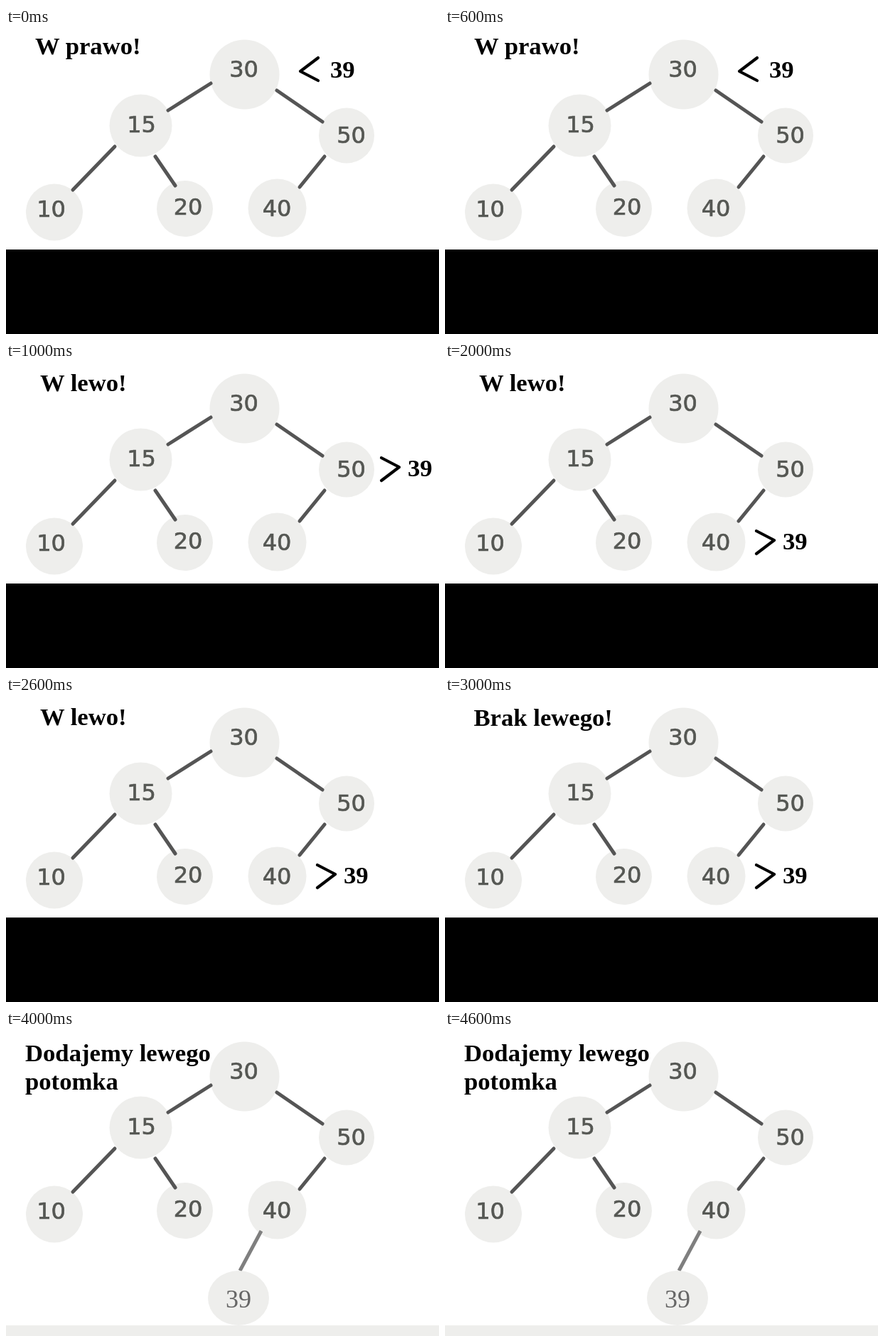
Animation of 609 by 431 pixels, one loop 5 s. Source, as an HTML page:

```html
<!DOCTYPE html>
<html lang="pl">
<head>
<meta charset="utf-8">
<style>
  html, body { margin: 0; width: 100%; height: 100%; overflow: hidden; background: #000; }
  svg { display: block; }
  text { white-space: pre; }
  .label { font: bold 34.67px "Liberation Serif", "Times New Roman", serif; }
  .node { font: 32px "DejaVu Sans", sans-serif; text-anchor: middle; fill: #555753; stroke: #555753; stroke-width: .7; }
  .added { font: 36px "Liberation Serif", serif; text-anchor: middle; fill: #666; }
  .edge { stroke: #555; stroke-width: 5; stroke-linecap: round; }
  .sign { fill: none; stroke: #000; stroke-width: 4.2; stroke-linecap: round; stroke-linejoin: round; }
</style>
</head>
<body>
<svg width="609" height="431" viewBox="0 0 609 431">
  <rect width="609" height="431" fill="#eeeeec"/>
  <rect width="609" height="416" fill="#fff"/>
  <g id="tree"></g>
  <g id="step"></g>
</svg>
<script>
const STEP_MS = 1000;

// circle x, y, radius, then value, text centre and baseline
const nodes = [
  [335.5, 65.5, 49, 30, 334.5, 68.5],
  [189.5, 137.5, 44, 15, 190.5, 147],
  [479, 151.5, 39, 50, 485.5, 162],
  [68, 259.5, 40, 10, 63.5, 266],
  [251.5, 254.5, 39.5, 20, 256, 263],
  [381.5, 253.5, 41, 40, 381, 265]
];
const edges = ["M288 78L228 116", "M381 88L445 132", "M153 167L94 228", "M210 181L238 222", "M448 181L413 224"];

const text = (cls, x, y, s) => `<text class="${cls}" x="${x}" y="${y}">${s}</text>`;
const label = (x, y, s) => text("label", x, y, s);
const compare = (sign, x, y) => `<path class="sign" d="${sign}"/>` + label(x, y, 39);
const less = "M439 42L414 61L439 74";
const greater = (x, y) => `M${x} ${y}l25 13l-25 19`;
const floor = '<rect y="312" width="609" height="119"/>';

const steps = [
  floor + label(41, 37, "W prawo!") + compare(less, 456, 70),
  floor + label(48, 41, "W lewo!") + compare(greater(528, 135), 565, 161),
  floor + label(48, 41, "W lewo!") + compare(greater(438, 238), 475, 264),
  floor + label(40.5, 42, "Brak lewego!") + compare(greater(438, 238), 475, 264),
  label(27, 44, "Dodajemy lewego") + label(27, 84, "potomka") +
    '<path d="M359 283L329 339" stroke="#7f7f7f" stroke-width="5"/>' +
    '<ellipse cx="327" cy="377.5" rx="43" ry="38.5" fill="#eeeeec"/>' +
    text("added", 327, 391, 39)
];

const tree = document.getElementById("tree");
const stage = document.getElementById("step");
tree.innerHTML =
  nodes.map(([x, y, r, value, tx, ty]) =>
    `<circle cx="${x}" cy="${y}" r="${r}" fill="#eeeeec"/>` + text("node", tx, ty, value)).join("") +
  edges.map(d => `<path class="edge" d="${d}"/>`).join("");

const start = performance.now();
let shown = -1;
function draw() {
  const i = Math.floor((performance.now() - start) / STEP_MS) % steps.length;
  if (i !== shown) stage.innerHTML = steps[shown = i];
  requestAnimationFrame(draw);
}
draw();
</script>
</body>
</html>
```
